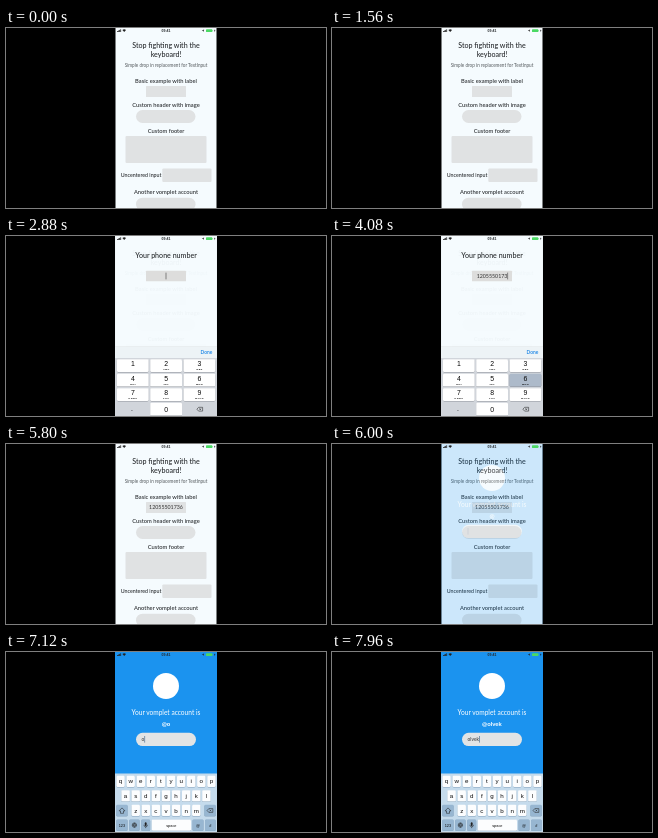
Animation, 320 px wide and 180 px high, one loop 8000 ms. Source, as an HTML page:

```html
<!DOCTYPE html>
<html lang="en">
<head>
<meta charset="utf-8">
<title>Full screen input demo</title>
<style>
  html, body { margin: 0; width: 100%; height: 100%; overflow: hidden; background: #000; }
  svg { display: block; width: 100%; height: 100%; }
  text { font-family: Lato, "Open Sans", sans-serif; fill: #26292c; text-anchor: middle; }
  .title { font-size: 7.1px; font-weight: 500; }
  .label { font-size: 5.75px; font-weight: 500; }
  .small { font-size: 4.65px; fill: #555a5e; }
  .value { font-size: 5.3px; fill: #333; }
  .left { text-anchor: start; }
  .box { fill: #e0e2e3; }
  .key, .num, .hint { font-family: "Liberation Sans", Arial, sans-serif; fill: #080808; }
  .key { font-size: 6.2px; }
  .num { font-size: 6.9px; }
  .hint { font-size: 2.5px; font-weight: bold; letter-spacing: .45px; }
  .tiny { font-size: 3.9px; }
  .white { fill: #fff; }
  .line { fill: none; stroke: #222; stroke-width: .55; }

  #phone, #numpad, #social, #letters { animation: 8s linear infinite; }
  #phone { animation-name: phone; }
  #numpad { animation-name: numpad; }
  #social { animation-name: social; }
  #letters { animation-name: letters; }

  @keyframes phone {
    0%, 22.5% { opacity: 0; animation-timing-function: ease-in-out; }
    30%, 59.5% { opacity: 1; animation-timing-function: ease-in-out; }
    65.5%, 100% { opacity: 0; }
  }
  @keyframes numpad {
    0%, 30.25% { transform: translateY(70px); animation-timing-function: cubic-bezier(.38, .7, .125, 1); }
    34.75%, 59% { transform: none; animation-timing-function: cubic-bezier(.38, .7, .125, 1); }
    63.5%, 100% { transform: translateY(70px); }
  }
  @keyframes social {
    0%, 73% { opacity: 0; animation-timing-function: ease-in-out; }
    79.8%, 100% { opacity: 1; }
  }
  @keyframes letters {
    0%, 79.9% { transform: translateY(59px); animation-timing-function: cubic-bezier(.38, .7, .125, 1); }
    84.4%, 100% { transform: none; }
  }
</style>
</head>
<body>
<svg viewBox="0 0 320 180">
  <defs>
    <clipPath id="screen"><rect x="109.5" width="101" height="180"/></clipPath>
  </defs>
  <rect width="320" height="180"/>
  <g clip-path="url(#screen)">
    <rect x="109" width="102" height="180" fill="#f5fbfe"/>
    <text class="title" x="160" y="19.8">Stop fighting with the</text>
    <text class="title" x="160" y="28.8">keyboard!</text>
    <text class="small" x="160" y="38.6">Simple drop in replacement for TextInput</text>
    <text class="label" x="160" y="55">Basic example with label</text>
    <rect class="box" x="140" y="58" width="40" height="11" rx=".6"/>
    <text class="value" id="saved" x="160" y="65.3"></text>
    <text class="label" x="160" y="78.5">Custom header with image</text>
    <rect class="box" x="130" y="82" width="59.5" height="13" rx="6.5"/>
    <text class="label" x="160" y="105">Custom footer</text>
    <rect class="box" x="119.5" y="108" width="81" height="27" rx="1"/>
    <text class="label left" x="114.7" y="149" style="font-size:5.3px">Uncentered input</text>
    <rect class="box" x="156.3" y="140.5" width="49.2" height="13.5" rx="1"/>
    <text class="label" x="160" y="166.3">Another vomplet account</text>
    <rect class="box" x="130" y="169.7" width="59.5" height="13" rx="6.5"/>

    <g id="phone">
      <rect x="109" width="102" height="180" fill="#f5fbfe" opacity=".965"/>
      <text class="title" x="160" y="22">Your phone number</text>
      <rect x="140" y="34.7" width="40" height="10.6" rx=".6" fill="#dddddc"/>
      <text class="value" id="number" x="160" y="41.9"></text>
      <rect id="numCaret" y="36.6" width=".6" height="6.8" fill="#444"/>
    </g>
    <g id="numpad">
      <rect x="109" y="110.5" width="102" height="11.5" fill="#edf3f6"/>
      <rect x="109" y="110.5" width="102" height=".3" fill="#d5dadd"/>
      <text x="200.5" y="117.8" style="font-size:4.9px;font-weight:600;fill:#1683e6">Done</text>
      <rect x="109" y="122" width="102" height="58" fill="#d1d5db"/>
    </g>

    <g id="social">
      <rect x="109" width="102" height="180" fill="#1b93ef"/>
      <circle class="white" cx="160" cy="34" r="13"/>
      <text class="white" x="160" y="63.2" style="font-size:6.6px">Your vomplet account is</text>
      <text class="white" id="handle" x="160" y="73.6" style="font-size:6.1px;font-weight:bold"></text>
      <rect x="130" y="80.7" width="60" height="13.4" rx="6.7" fill="#e2e4e5"/>
      <text class="value left" id="user" x="135.6" y="89.1" style="font-size:4.9px"></text>
      <rect id="userCaret" y="84" width=".6" height="6.6" fill="#3b5f85"/>
    </g>
    <g id="letters">
      <rect x="109" y="121.5" width="102" height="59" fill="#c5dbec"/>
    </g>

    <g id="status">
      <g fill="#222">
        <rect x="111" y="3" width=".8" height="1"/>
        <rect x="112.1" y="2.5" width=".8" height="1.5"/>
        <rect x="113.2" y="1.9" width=".8" height="2.1"/>
        <rect x="114.3" y="1.3" width=".8" height="2.7"/>
        <path d="M116.4 2.1Q118.2.6 120 2.1L118.2 4.1Z"/>
        <path d="M195.7 2.5L198.2 1.5L197.2 4.1L196.9 2.8Z"/>
        <path d="M209.1 1.2L207.9 2.9H208.6L208.3 4.2L209.5 2.4H208.8Z"/>
      </g>
      <text x="160" y="4.1" style="font:600 3.5px 'Liberation Sans',sans-serif">09:41</text>
      <rect x="200" y="1.2" width="6.3" height="2.9" rx=".7" fill="#4bd964"/>
      <rect x="206.5" y="2.1" width=".5" height="1.1" fill="#4bd964"/>
    </g>
  </g>
</svg>
<script>
const LOOP = 8000, NUMBER = "12055501736", USER = "olvek";
const $ = id => document.getElementById(id);

function add(parent, tag, attrs, text = "") {
  const el = document.createElementNS("http://www.w3.org/2000/svg", tag);
  for (const name in attrs) el.setAttribute(name, attrs[name]);
  el.textContent = text;
  parent.append(el);
  return el;
}

function keyCap(parent, x, y, width, height, fill, shade) {
  const box = { x, width, height, rx: 1.3 };
  add(parent, "rect", { ...box, y: y + .4, fill: shade });
  return add(parent, "rect", { ...box, y, fill });
}

function deleteIcon(parent, x, y) {
  const d = `M${x - 2.8} ${y}l1.7-1.9h4v3.8h-4zM${x - .3} ${y - .8}l1.6 1.6m0-1.6l-1.6 1.6`;
  add(parent, "path", { class: "line", d });
}

// Number pad
const pad = $("numpad"), padKeys = {};
const hints = ["", "ABC", "DEF", "GHI", "JKL", "MNO", "PQRS", "TUV", "WXYZ"];

function padKey(digit, col, row, hint) {
  const x = 110.9 + col * 33.3, y = 123.3 + row * 14.5;
  padKeys[digit] = keyCap(pad, x, y, 31.8, 12.7, "#fff", "#8f949b");
  add(pad, "text", { class: "num", x: x + 15.9, y: y + (row < 3 ? 7.1 : 8.9) }, digit);
  if (hint) add(pad, "text", { class: "hint", x: x + 16.1, y: y + 11.1 }, hint);
}
hints.forEach((hint, i) => padKey(String(i + 1), i % 3, Math.floor(i / 3), hint));
padKey("0", 1, 3);
add(pad, "text", { class: "num", x: 126, y: 174.8 }, ".");
deleteIcon(pad, 193.7, 173.2);

// Letter keyboard
const board = $("letters"), caps = [];
const SHADE = "#83a0b9", DARK = "#97b6d1";
["qwertyuiop", "asdfghjkl", "zxcvbnm"].forEach((row, r) => {
  [...row].forEach((char, i) => {
    const x = 160 + (i - (row.length - 1) / 2) * 10.1, y = 123.7 + r * 14.55;
    keyCap(board, x - 4.25, y, 8.5, 11.3, "#fcfdfe", SHADE);
    caps.push({ char, el: add(board, "text", { class: "key", x, y: y + 7.7 }) });
  });
});
const shiftKey = keyCap(board, 110.3, 152.8, 11.3, 11.3, DARK, SHADE);
const shiftIcon = add(board, "path", { d: "M116 155.9l3 3h-1.5v2.4h-3v-2.4h-1.5z", stroke: "#111", "stroke-width": .5 });
keyCap(board, 198.4, 152.8, 11.3, 11.3, DARK, SHADE);
deleteIcon(board, 203.9, 158.5);

function bottomKey(x, width, label, cls, fill = DARK) {
  keyCap(board, x, 167.4, width, 11.3, fill, SHADE);
  add(board, "text", { class: "key " + cls, x: x + width / 2, y: 174.6 }, label);
}
bottomKey(110.3, 11.3, "123", "tiny");
bottomKey(123.2, 10.4, "", "");
bottomKey(135.2, 9, "", "");
bottomKey(145.7, 39.3, "space", "tiny", "#fcfdfe");
bottomKey(186.5, 11, "@", "tiny");
bottomKey(199, 10.7, "#", "tiny");
add(board, "circle", { class: "line", cx: 128.4, cy: 173.1, r: 2.2 });
add(board, "path", { class: "line", d: "M126.2 173.1h4.4M128.4 170.9q-2 2.2 0 4.4q2-2.2 0-4.4" });
add(board, "rect", { x: 138.8, y: 170.3, width: 1.8, height: 3.6, rx: .9, fill: "#222" });
add(board, "path", { class: "line", d: "M137.9 172.8q0 2 1.8 2t1.8-2M139.7 174.8v1.3" });

// Number of characters entered when each key takes `step` ms
const typed = (t, first, step, max) =>
  Math.max(0, Math.min(max, Math.floor((t - first) / step) + 1));

function render(t) {
  const first = 3040, step = 108;
  const count = typed(t, first, step, NUMBER.length);
  const number = $("number");
  number.textContent = NUMBER.slice(0, count);
  const width = count ? number.getComputedTextLength() : 0;
  $("numCaret").setAttribute("x", 159.7 + width / 2 + (count ? .4 : 0));
  $("saved").textContent = t >= 4700 ? NUMBER : "";

  const wait = first + count * step - t;
  const pressed = wait > 0 && wait <= 70 ? NUMBER[count] : null;
  for (const digit in padKeys)
    padKeys[digit].setAttribute("fill", digit === pressed ? "#adbaca" : "#fff");

  const name = USER.slice(0, typed(t, 7040, 190, USER.length));
  $("user").textContent = name;
  $("handle").textContent = "@" + name;
  const nameWidth = name ? $("user").getComputedTextLength() : 0;
  $("userCaret").setAttribute("x", 135.7 + nameWidth);

  const upper = t < 6880;
  for (const { char, el } of caps) el.textContent = upper ? char.toUpperCase() : char;
  shiftKey.setAttribute("fill", upper ? "#fcfdfe" : DARK);
  shiftIcon.setAttribute("fill", upper ? "#111" : "none");
}

let start;
function tick(now) {
  start ??= now;
  render((now - start) % LOOP);
  requestAnimationFrame(tick);
}
render(0);
requestAnimationFrame(tick);
</script>
</body>
</html>
```
